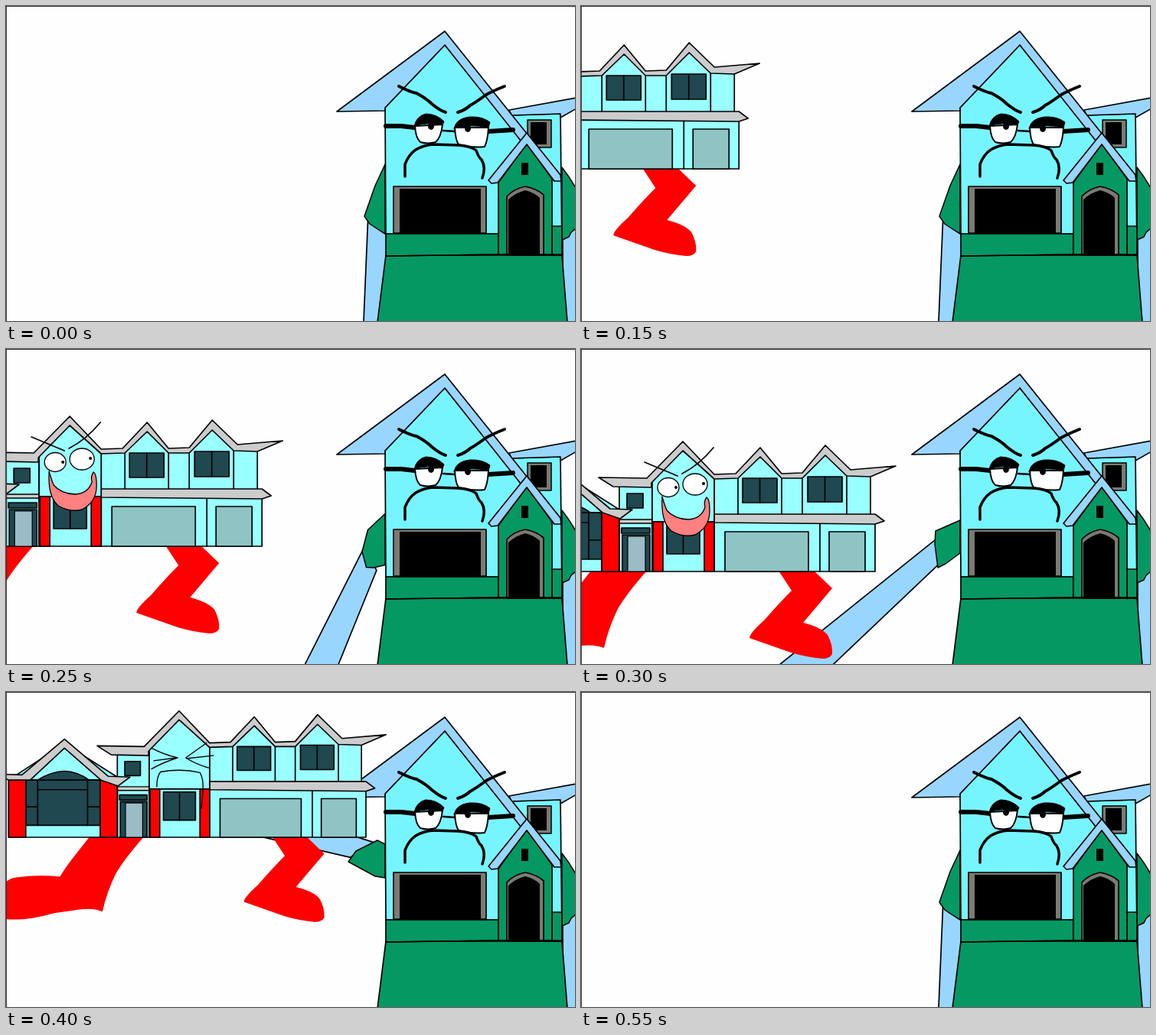
An HTML page with a canvas for the animation above (600 ms loop, 743x412 px).

```html
<!DOCTYPE html>
<html lang="en">
<head>
<meta charset="utf-8">
<title>Two houses</title>
<style>
html, body { margin: 0; width: 100%; height: 100%; overflow: hidden; background: #fefefe; }
canvas { display: block; }
</style>
</head>
<body>
<canvas id="stage" width="743" height="412"></canvas>
<script>
const ctx = document.getElementById('stage').getContext('2d');
const LOOP = 600, STEP = 50;
const CYAN = '#99ffff', GREY = '#cccccc', GLASS = '#204850', GARAGE = '#90c4c4', RED = '#ff0000';
const WALL = '#77f5ff', BLUE = '#99d6ff', GREEN = '#059862', TRIM = '#7b7b74';

// Fill and/or stroke an SVG path string.
function shape(d, fill, width = 1.7) {
  const path = new Path2D(d);
  if (fill) { ctx.fillStyle = fill; ctx.fill(path); }
  if (width) { ctx.lineWidth = width; ctx.strokeStyle = '#000'; ctx.stroke(path); }
}
const line = (d, width) => shape(d, null, width);
const box = (x1, y1, x2, y2, fill, width) => shape(`M${x1} ${y1}H${x2}V${y2}H${x1}Z`, fill, width);
function oval(x, y, rx, ry, fill, width = 1.3) {
  ctx.beginPath();
  ctx.ellipse(x, y, rx, ry, 0, 0, Math.PI * 2);
  ctx.fillStyle = fill;
  ctx.fill();
  if (width) { ctx.lineWidth = width; ctx.stroke(); }
}
function pane(x1, y1, x2, y2) {
  box(x1, y1, x2, y2, GLASS);
  line(`M${(x1 + x2) / 2} ${y1}V${y2}`);
}

// ---- running house ----
function legs() {
  shape('M258 290H304L328 313L290 358Q314 364 322 374Q329 387 328 399Q325 405 315 405Q294 403 274 397L220 378Q220 372 239 355Q260 331 275 316Z', RED, 0);
  shape('M13 290H86Q57 323 47 342Q36 365 30 391Q18 386 1 388L-35 393Q-73 404 -102 401Q-110 392 -111 376Q-110 362 -103 354Q-95 346 -86 345Q-56 341 -27 344Q-20 332 -9 318Z', RED, 0);
}

function leftWing() {
  shape('M-96 291V214L-21 165L50 210V291Z', CYAN);
  shape('M-73 275V214L-57 214Q-40 203 -21 202Q-2 203 12 214H28V275Z', GLASS);
  line('M-57 214V275M10 214V275M-57 227H10M-73 250H-57M10 250H28M-73 214H28');
  box(-96, 214, -73, 291, RED);
  box(27, 214, 50, 291, RED);
  shape('M-112 206L-78 207L-21 159L38 209L67 210L51 222L28 214L-21 171L-67 214H-96Z', GREY);
}

function mainBlock() {
  box(50, 179, 93, 291, CYAN);
  box(60, 189, 81, 208, GLASS);
  box(50, 223, 93, 228, GREY, 1.4);
  box(53, 234, 90, 241, GLASS);
  box(54, 243, 90, 291, GLASS);
  box(61, 245, 84, 291, '#9bbcc6', 1.2);

  shape('M174 168H205L234 138L262 168H289L319 136L347 165H378V217H174Z', CYAN);
  line('M205 168V216M262 168V216M289 168V216M347 165V216');
  pane(211, 169, 256, 201);
  pane(296, 167, 341, 200);
  box(174, 226, 384, 291, CYAN);
  box(188, 239, 297, 291, GARAGE);
  box(324, 239, 371, 291, GARAGE);
  line('M312 227V291');
  shape('M174 216H384L396 225L384 229L174 227Z', GREY);

  shape('M93 173L133 131L174 170V291H93Z', CYAN);
  line('M93 226H174');
  box(94, 226, 107, 291, RED);
  box(161, 226, 174, 291, RED);
  pane(112, 230, 155, 268);
  shape('M23 168L86 169L133 121L174 164L202 163L234 129L262 163L289 162L319 126L352 158L411 153L378 167L347 166L319 139L289 169L262 169L234 141L205 169L174 170L133 133L92 175V181L42 180Z', GREY);
}

function gleefulFace() {
  oval(114, 181, 14, 12.5, '#fff');
  oval(149, 177, 16, 14, '#fff');
  oval(124, 181, 2, 2, '#000', 0);
  oval(160, 176, 2, 2, '#000', 0);
  line('M83 148L126 166M173 129Q154 152 132 163', 1.7);
  shape('M106 193Q104 226 118 238Q133 247 149 243Q168 233 168 212Q168 196 164 194Q160 199 162 207Q157 222 140 223Q121 222 112 211Q109 204 106 193Z', '#ff8080', 1.3);
}

function hurtFace() {
  line('M96 171Q113 180 131 184Q112 190 96 199M99 188L130 184', 1.4);
  line('M170 164L142 184Q156 193 174 198M179 181L143 185', 1.4);
  line('M103 223Q103 209 108 203Q136 198 161 204Q166 212 165 228L163 252', 1.4);
}

function runningHouse(x, y, hurt) {
  const scale = hurt ? 0.972 : 1;
  ctx.save();
  ctx.translate(x, y);
  ctx.scale(scale, scale);
  ctx.translate(-384, -291);
  legs();
  mainBlock();
  leftWing();
  hurt ? hurtFace() : gleefulFace();
  ctx.restore();
}

function drawRunner(t) {
  if (t < 400) {
    const s = t / 100;
    runningHouse(-57 + 204 * s - 19 * s * s, 198 - 11 * s + 14 * s * s, false);
  } else {
    const s = (t - 400) / 50;
    runningHouse(470 + 12 * s, 190 - 181 * s, true);
  }
}

// ---- punching arm: shoulder x, y, angle, then the sleeve outline ----
const REST = [486, 282, 90, 495, 207, 482, 235, 468, 275, 475, 285, 484, 291, 495, 298];
const WIND = [466, 264, 138.8, 495, 224, 463, 238, 462, 255, 466, 286, 476, 281, 495, 267];
const PUNCH = [465, 206, 195.4, 495, 199, 485, 194, 457, 208, 447, 222, 482, 241, 495, 243];
const POSES = [[0, REST], [200, REST], [300, WIND], [400, PUNCH], [450, PUNCH], [550, REST], [600, REST]];

function poseAt(t) {
  const i = POSES.findIndex(([end]) => end > t);
  const [t0, from] = POSES[i - 1], [t1, to] = POSES[i];
  return from.map((v, k) => v + (to[k] - v) * (t - t0) / (t1 - t0));
}

function punchingArm(t) {
  const [x, y, angle, ...cuff] = poseAt(t);
  ctx.save();
  ctx.translate(x, y);
  ctx.rotate(angle * Math.PI / 180);
  shape('M-12 13L297 26L314 45L320 -51L292 -25.5L12 -14Z', BLUE);
  ctx.restore();
  shape(`M${cuff.join(' ')}Z`, GREEN, 1.5);
}

// ---- angry house ----
function angryWalls() {
  shape('M727 290L750 290V420H727Z', BLUE);
  shape('M726 211Q737 225 745 240V290L738 296L735 302L726 306Z', GREEN, 1.5);
  shape('M496 326H726L733 414H485Z', GREEN);
  shape('M655 143L724 141L726 326H655Z', WALL);
  shape('M657 136L745 120V134L724 146V141L660 143Z', BLUE);
  box(681, 149, 712, 185, TRIM, 1.5);
  box(685, 152, 706, 181, '#000', 0);
  shape('M495 133L573 51L680 182V298H496Z', WALL);
  shape('M432 138L573 33L681 168L672 176L573 51L495 133V137Z', BLUE);
  shape('M496 298H643V325L496 327Z', GREEN);
  box(506, 236, 627, 297, TRIM);
  box(514, 239, 620, 297, '#000', 0);
}

function porch() {
  shape('M713 288H726V326H713Z', GREEN);
  shape('M643 231L680 180L713 226V325H643Z', GREEN);
  shape('M630 228L680 166L724 221L725 229H716L680 181L642 231L634 232Z', BLUE);
  box(673, 205, 682, 221, '#000', 0);
  shape('M654 325V249Q663 239 678 236Q693 239 702 247V325Z', TRIM);
  shape('M656 325V253Q666 244 678 241Q690 244 697 251V325Z', '#000', 0);
  line('M496 327L643 325H726');
}

function angryFace() {
  line('M513 105Q529 113 536 114Q549 121 556 128Q567 137 574 139', 4);
  line('M651 105Q636 111 627 116Q612 127 606 130Q600 136 590 139', 4);
  line('M496 157L516 157L534 159M630 164L662 162', 6);
  line('M571 163L586 164', 2.5);
  shape('M534 157Q535 173 541 178Q551 181 561 178Q568 172 570 155Z', '#fff', 2);
  shape('M586 159Q587 176 591 181Q608 186 625 184Q629 176 630 159Z', '#fff', 2);
  oval(555, 157, 4, 5, '#000', 0);
  oval(603, 160, 4, 5, '#000', 0);
  shape('M533 157Q536 144 548 141Q562 141 572 151L570 156Q551 151 533 157Z', '#000', 1);
  shape('M585 160Q588 147 605 145Q622 144 632 152L630 159Q607 154 585 160Z', '#000', 1);
  line('M521 223V207Q526 194 535 188Q545 182 558 181L590 182Q607 183 614 189Q617 198 621 201Q627 211 622 225', 3.5);
}

function render(t) {
  ctx.fillStyle = '#fefefe';
  ctx.fillRect(0, 0, 743, 412);
  punchingArm(t);
  angryWalls();
  porch();
  angryFace();
  drawRunner(t);
  ctx.fillStyle = '#333';
  ctx.fillRect(0, 0, 743, 1);
  ctx.fillRect(0, 0, 1, 412);
}

ctx.lineJoin = ctx.lineCap = 'round';
const start = performance.now();
function tick(now) {
  const t = Math.max(0, now - start) % LOOP;
  render(Math.floor(t / STEP) * STEP);
  requestAnimationFrame(tick);
}
render(0);
requestAnimationFrame(tick);
</script>
</body>
</html>
```
